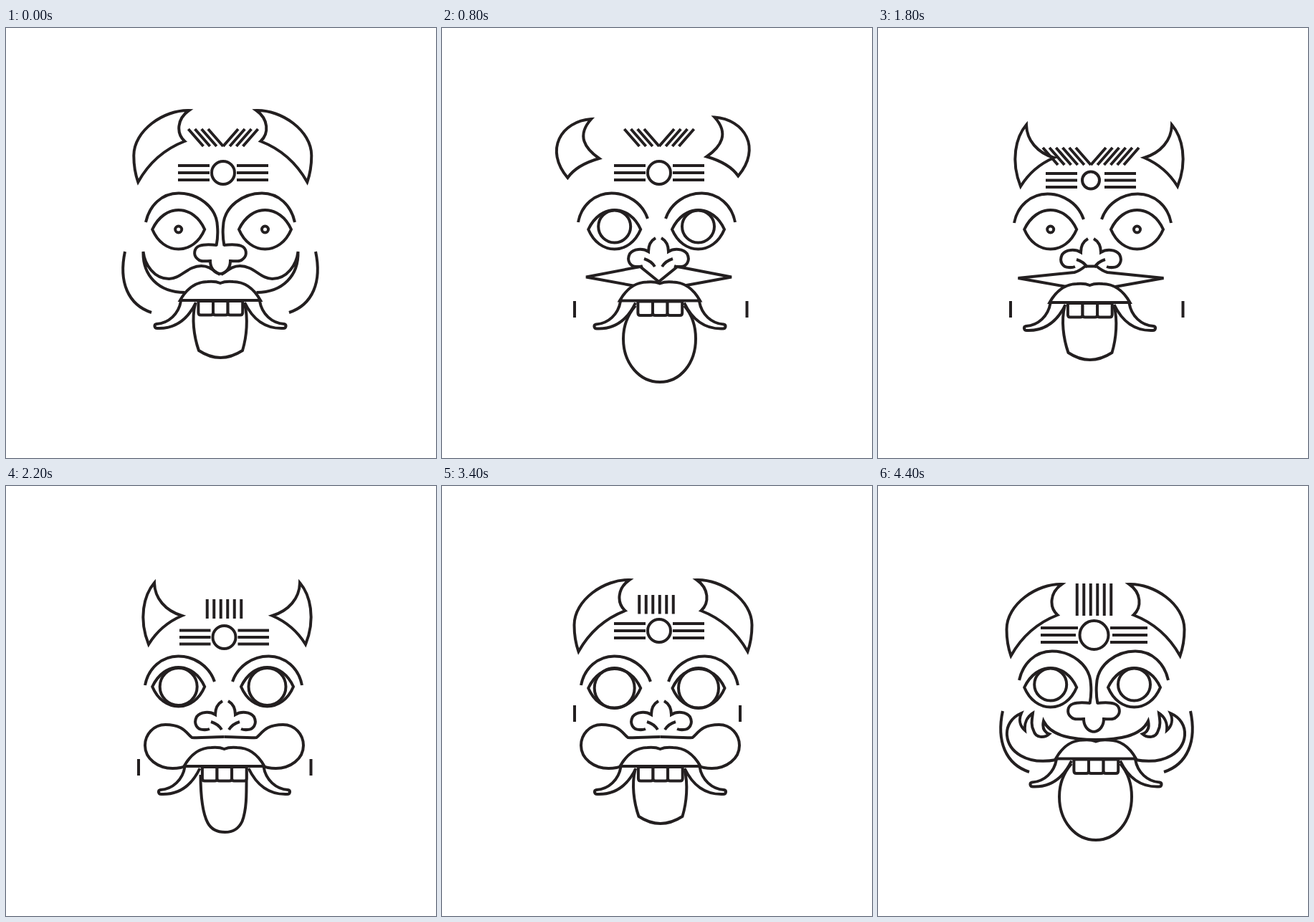
These frames come from a looping animation (600 px wide and 600 px high, 4.6 s). An HTML page:

```html
<!DOCTYPE html>
<html lang="en">
<head>
<meta charset="utf-8">
<title>Masks</title>
<style>
html, body { margin: 0; width: 100%; height: 100%; overflow: hidden; background: #fff; }
svg { display: block; width: 100vw; height: 100vh; }
</style>
</head>
<body>
<svg viewBox="0 0 600 600"><g id="face" fill="none" stroke="#231f20" stroke-width="4"></g></svg>
<script>
const face = document.getElementById('face');
const STEP = 200, LOOP = 4600;

// Half shapes lie left of x = 0 and are mirrored around an axis.
const HORN = {
  big: 'M-47,115C-82,114 -124,143 -124,178Q-124,198 -118,215C-104,190 -84,170 -53,158C-65,147 -64,127 -47,115Z',
  bull: 'M-86,129C-128,132 -152,172 -119,211C-110,198 -96,190 -75,184C-95,170 -107,152 -86,129Z',
  sharp: 'M-101.5,135C-116,152 -124,185 -109.5,221C-99,204 -84,190 -63,181C-86,174 -101,157 -101.5,135Z'
};
const BROW = {
  joined: 'M-104,271C-99,248 -82,230.5 -58,230.5C-33,230.5 -5,248 -4,277C-3,288 -4,296 -5.5,304',
  free: 'M-109.5,271C-105,247 -86,230.5 -63,230.5C-41,230.5 -20,244 -12.5,266'
};
const NOSE = {
  joined: 'M-4.5,303C-13,302 -24,302 -29,304C-37,307 -38,317 -32,322C-28,327 -20,325 -14,325C-14,334 -9,342 0,343',
  free: 'M-4,293C-11,297 -14,304 -14,312C-22,307 -35,308 -40,315C-45,325 -39,333 -31,333Q-26,333.5 -22,332M-20,322Q-10,325 -5,333'
};
const STACHE = {
  curl: 'M-1,344C-9,340 -14,332 -27,332C-46,332 -56,350 -72,350C-93,350 -106,330 -108,312C-109,345 -87,369 -50,369',
  flame: 'M0,354C-30,354 -62,350 -73,328C-75,337 -73,343 -65,346C-72,352 -84,352 -87,341C-91,333 -89,325 -88,317C-96,322 -100,331 -99,341C-106,335 -108,326 -104,317C-118,323 -125,335 -124,348C-122,370 -98,390 -55,382',
  spike: 'M0,354L-26,333L-101.5,347.5L-33,360',
  flat: 'M0,332.5L-8,332.5Q-16,339 -23,341L-101.5,349L-34,361',
  bulb: 'M0,350C-20,350 -34,352 -45,351C-53,345 -57,333 -82,333C-99,333 -110.5,347 -110.5,362C-110.5,381 -92,394 -72,394Q-60,394 -52,390'
};
const TONGUE = {
  short: 'M-35,5C-40,25 -37,50 -30,70Q0,90 31,70C37,50 39,25 34,5',
  round: 'M-34,7C-46,21 -51,37 -51,53C-51,88 -28,113.5 0,113.5C28,113.5 50,88 50,53C50,37 46,21 34,7',
  long: 'M-33,12C-33,39 -31,64 -23,79Q-16,92 1,92Q18,92 25,77C32,59 31,34 31,7',
  fork: 'M-36,6C-39,27 -38,52 -33,68Q-30,72 -26,68C-17,57 -9,48.5 0,48.5C8,48.5 16,60 24,69Q28,72 31,68C37,52 38,27 34,4'
};
const LIP = 'M-56,0C-46,-18 -32,-26 -18,-26Q-7,-27 0,-24Q7,-27 18,-26C32,-26 46,-18 56,0Z';
const FANG = 'M-55,1C-58,19 -72,32 -89,33C-93,34 -92,39 -88,39C-64,40 -46,28 -34,3';
const EYE = 'M-36.5,0C-28,-18 -14,-27 0,-27C15,-27 29,-17 36.5,0C29,18 15,27.5 0,27.5C-15,27.5 -29,18 -36.5,0Z';
const CHEEK = 'M0,0C-9,42 4,74 37,85';

// horns: kind, axis, dy        hair: centre, top, length, slanted lines per side
// mark: x, y, radius, inner, outer, gap      eyes: right x, y, pupil radius, pupil dy
// nose: kind, brow axis, nose axis, dy       cheek: kind, left x, right x, y
// mouth: moustache, axis, dy, lip x, lip y
const POSES = [
  { horns: ['big', 302.3, 0], hair: [303, 141, 24, 4], mark: [303, 202, 16, 19, 63, 10],
    eyes: [361.5, 281, 4.5, 0], nose: ['joined', 299, 299, 0], cheek: ['arc', 166, 432, 312],
    mouth: ['curl', 299.5, 0, 299, 380], tongue: 'short' },
  { horns: ['big', 303.5, 22], hair: [301.5, 136, 45, 0], mark: [301.5, 208, 20, 22.5, 74.5, 10],
    eyes: [357.5, 281, 22.5, -4], nose: ['joined', 301, 301, 0], cheek: ['arc', 174, 436, 314],
    mouth: ['flame', 304, 0, 304, 380.5], tongue: 'round' },
  { horns: ['bull', 295.8, 0], hair: [299.5, 124, 55, 0], mark: [299, 202, 12, 19, 63, 10],
    eyes: [357.5, 281, 17.5, 0], nose: ['free', 299.5, 302, 0], cheek: ['bar', 181, 412, 306],
    mouth: ['spike', 302.5, 0, 304, 380.5], tongue: 'round' },
  { horns: ['sharp', 308.5, 0], hair: [304.5, 158, 27, 0], mark: [304.5, 211, 16, 19, 62.5, 9.5],
    eyes: [364.5, 280, 26, 0], nose: ['free', 303.5, 306, 7], cheek: ['bar', 185, 425.5, 381],
    mouth: ['bulb', 304.5, 0, 304.5, 391], tongue: 'long' },
  { horns: ['sharp', 296.5, 6], hair: [297, 167, 24, 6], mark: [297, 212.5, 12, 19, 63, 9.5],
    eyes: [358, 282, 28, 0], nose: ['free', 299.5, 297, 1], cheek: ['arc', 184, 411, 309],
    mouth: ['flat', 297, 0, 295.5, 383], tongue: 'fork' },
  { horns: ['sharp', 295.5, -2.5], hair: [299, 152, 26.5, 0], mark: [299, 204, 12, 21, 69, 12],
    eyes: [357.5, 281, 17.5, -11], nose: ['free', 299, 296, 0], cheek: ['arc', 163, 428, 324],
    mouth: ['bulb', 295, -3.5, 295, 381.5], tongue: 'fork' }
];
const PARTS = ['horns', 'hair', 'mark', 'eyes', 'nose', 'cheek', 'mouth', 'tongue'];

// One digit per part picks its pose; then horn dx, horn dy, cheek dx.
const MIXES = `00000000
45324143 0 0 5
11111111
32540200 0 -10
20012322 -1.5 -2
51251411
22222222
01333234 0 4
25023430 5
34404340
40351115
33333333
45423430 5 0 5
43010204 6 0 6
43010204 6 0 6
44444444
45135245 6 0 4
15043230 5 -6 4
24401211 2 5
30252222 0 -11
55555555
20340400 4
11111111`.split('\n').map(row => row.split(' '));

const path = (d, x = 0, y = 0, flip = 1, fill = 'none') =>
  `<path d="${d}" transform="translate(${x} ${y}) scale(${flip} 1)" fill="${fill}"/>`;
const both = (d, x, y, fill) => path(d, x, y, 1, fill) + path(d, x, y, -1, fill);
const line = (x1, y1, x2, y2) => path(`M${x1},${y1}L${x2},${y2}`);
const ring = (x, y, r) => `<circle cx="${x}" cy="${y}" r="${r}"/>`;
const repeat = (n, f) => Array.from({ length: n }, (_, i) => f(i)).join('');

const draw = {
  horns([kind, axis, dy], sx, sy) {
    const x = axis + sx, y = dy + sy, d = HORN[kind];
    return path(d, x, y) + path(d, x, y - (kind === 'bull' ? 2.5 : 0), -1);
  },
  hair([x, y, len, slant]) {
    if (!slant) return repeat(6, i => line(x + (i - 2.5) * 9.5, y, x + (i - 2.5) * 9.5, y + len));
    return both(Array.from({ length: slant }, (_, i) =>
      `M${-21 - i * 9.2},${y}L${-i * 9.2},${y + len}`).join(''), x, 0);
  },
  mark([x, y, r, inner, outer, gap]) {
    const rows = [-1, 0, 1].map(i => {
      const near = inner + (!i && r > 18 ? 3 : 0);
      return `M${-outer},${i * gap}H${-near}`;
    });
    return both(rows.join(''), x, y) + ring(x, y, r);
  },
  eyes([right, y, r, dy]) {
    return [240.7, right].map(x => path(EYE, x, y) + ring(x, y + dy, r)).join('');
  },
  nose([kind, brow, axis, dy]) {
    return both(BROW[kind], brow, dy) + both(NOSE[kind], axis, dy);
  },
  cheek([kind, left, right, y], dx) {
    const d = kind === 'arc' ? CHEEK : 'M0,0V23';
    return path(d, left + dx, y) + path(d, right + dx, y, -1);
  },
  mouth([kind, axis, dy, x, y], tongue) {
    const teeth = repeat(3, i =>
      path('M-10.3,1V17Q-10.3,20.5 -7,20.5H7Q10.3,20.5 10.3,17V1Z', x + 0.3 + (i - 1) * 20.6, y, 1, '#fff'));
    return both(STACHE[kind], axis, dy) + path(TONGUE[tongue], x, y) +
      both(FANG, x, y) + teeth + path(LIP, x, y, 1, '#fff');
  }
};

function render([mix, hx = 0, hy = 0, cx = 0]) {
  const p = {};
  PARTS.forEach((name, i) => { p[name] = POSES[mix[i]][name]; });
  face.innerHTML = draw.cheek(p.cheek, +cx) + draw.horns(p.horns, +hx, +hy) + draw.hair(p.hair) +
    draw.mark(p.mark) + draw.eyes(p.eyes) + draw.nose(p.nose) + draw.mouth(p.mouth, p.tongue);
}

const start = performance.now();
let shown = -1;
function tick() {
  const i = Math.floor(((performance.now() - start) % LOOP) / STEP);
  if (i !== shown) render(MIXES[shown = i]);
  requestAnimationFrame(tick);
}
tick();
</script>
</body>
</html>
```
